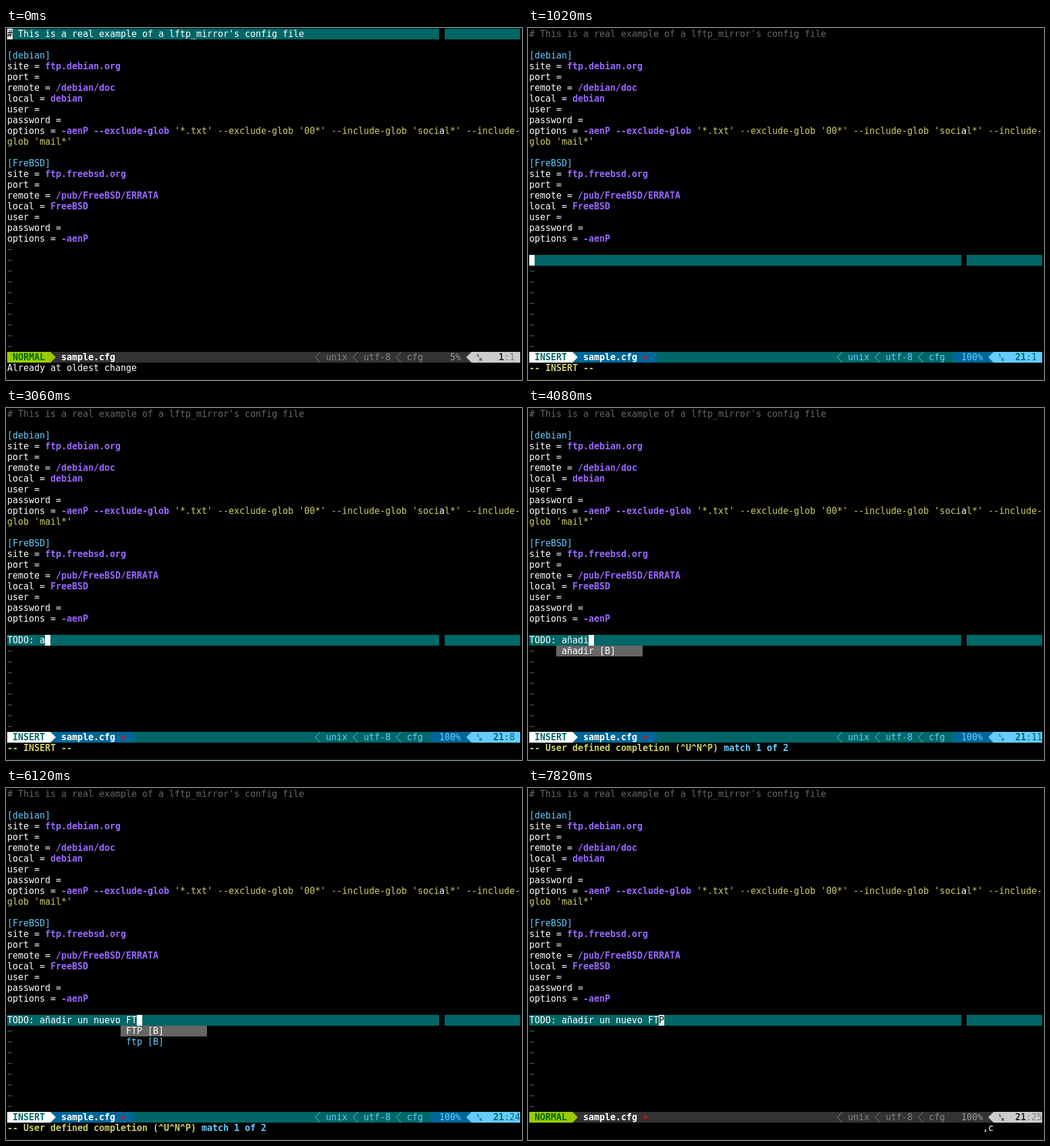
These frames come from a looping animation (860 by 588 pixels, 8 s). An HTML page with a canvas:

```html
<!DOCTYPE html>
<html lang="en">
<head>
<meta charset="utf-8">
<title>Editor session</title>
<style>
  html, body { margin: 0; width: 860px; height: 588px; overflow: hidden; background: #000; }
  canvas { display: block; }
</style>
</head>
<body>
<canvas id="screen" width="860" height="588"></canvas>
<script>
const ctx = document.getElementById('screen').getContext('2d');
const LOOP = 8000, CELL = 9, LINE = 18, COLS = 95, MARGIN_COL = 80;
const STATUS_ROW = 30, MESSAGE_ROW = 31;
const FAMILY = '"DejaVu Sans Mono", monospace';

const WHITE = '#ffffff', BLACK = '#000000', TEAL = '#006666', BLUE = '#006699',
      SKY = '#66ccff', PURPLE = '#9966ff', YELLOW = '#cccc66', GRAY = '#666666';

const X = col => 2 + col * CELL;
const Y = row => 1 + row * LINE;

function box(col, row, cols, color) {
  ctx.fillStyle = color;
  ctx.fillRect(X(col), Y(row), cols * CELL, LINE);
}

function put(col, row, text, color, bold = false) {
  ctx.font = (bold ? 'bold ' : '') + '15px ' + FAMILY;
  ctx.fillStyle = color;
  [...text].forEach((ch, i) => {
    if (ch !== ' ') ctx.fillText(ch, X(col + i), Y(row) + 14);
  });
}

// Filled status-line divider; dir is 1 for right-pointing, -1 for left-pointing.
function arrow(col, dir, color) {
  const base = X(dir > 0 ? col : col + 1), y = Y(STATUS_ROW);
  ctx.fillStyle = color;
  ctx.beginPath();
  ctx.moveTo(base, y);
  ctx.lineTo(base + dir * CELL, y + LINE / 2);
  ctx.lineTo(base, y + LINE);
  ctx.fill();
}

function chevron(col, color) {
  const x = X(col), y = Y(STATUS_ROW);
  ctx.strokeStyle = color;
  ctx.lineWidth = 1;
  ctx.beginPath();
  ctx.moveTo(x + 8.5, y + 0.5);
  ctx.lineTo(x + 0.5, y + LINE / 2);
  ctx.lineTo(x + 8.5, y + LINE - 0.5);
  ctx.stroke();
}

// Each row is a list of [text, color, bold] runs.
const setting = (key, value = '') => [[key + ' = ', WHITE], [value, PURPLE, true]];
const section = name => [['[' + name + ']', SKY]];
const FILE = [
  [["# This is a real example of a lftp_mirror's config file", GRAY]],
  [],
  section('debian'),
  setting('site', 'ftp.debian.org'),
  setting('port'),
  setting('remote', '/debian/doc'),
  setting('local', 'debian'),
  setting('user'),
  setting('password'),
  [...setting('options', '-aenP --exclude-glob'),
   [" '*.txt' --exclude-glob '00*' --include-glob 'social*' --include-", YELLOW]],
  [["glob 'mail*'", YELLOW]],
  [],
  section('FreBSD'),
  setting('site', 'ftp.freebsd.org'),
  setting('port'),
  setting('remote', '/pub/FreeBSD/ERRATA'),
  setting('local', 'FreeBSD'),
  setting('user'),
  setting('password'),
  setting('options', '-aenP')
];

const NORMAL = {
  name: 'NORMAL', modeBg: '#99cc00', modeFg: '#006600', fileBg: '#333333', midBg: '#333333',
  info: '#808080', dividers: ['#aa8866', '#7788aa', '#6688aa'], percentBg: '#333333',
  percentFg: '#999999', posBg: '#cccccc', lineFg: '#262626', colFg: '#808080'
};
const INSERT = {
  name: 'INSERT', modeBg: WHITE, modeFg: TEAL, fileBg: BLUE, midBg: TEAL,
  info: SKY, dividers: [SKY, SKY, SKY], percentBg: BLUE,
  percentFg: SKY, posBg: SKY, lineFg: TEAL, colFg: TEAL
};

const OLDEST = [['Already at oldest change', WHITE]];
const INSERTING = [['-- INSERT --', YELLOW, true]];
const COMPLETING = [['-- User defined completion (^U^N^P) ', YELLOW, true],
                    ['match 1 of 2', SKY, true]];

const browse = (at, row, line, percent) =>
  ({ at, mode: NORMAL, row, col: 0, line, column: 1, percent, message: OLDEST });

// The status line lags one column behind while the completion menu is open.
const type = (at, text, menu) => ({
  at, mode: INSERT, text, row: 21, col: text.length, line: 21, percent: '100%',
  column: text.length + (menu ? 0 : 1), menu, message: menu ? COMPLETING : INSERTING
});

const leave = (at, mode, column, keys) => ({
  at, mode, text: 'TODO: añadir un nuevo FTP', row: 21, col: 24, line: 21,
  percent: '100%', column, keys, message: []
});

const STEPS = [
  browse(0, 0, 1, '5%'),
  browse(340, 19, 19, '100%'),
  type(1020, ''),
  type(1700, 'TO', { col: 0, items: ['TODO [B]'] }),
  type(2040, 'TODO'),
  type(2380, 'TODO: '),
  type(3060, 'TODO: a'),
  type(3740, 'TODO: añ'),
  type(4080, 'TODO: añadi', { col: 6, items: ['añadir [B]'] }),
  type(4420, 'TODO: añadir '),
  type(4760, 'TODO: añadir u'),
  type(5100, 'TODO: añadir un '),
  type(5440, 'TODO: añadir un nue', { col: 16, items: ['nuevo [B]'] }),
  type(5780, 'TODO: añadir un nuevo '),
  type(6120, 'TODO: añadir un nuevo FT', { col: 22, items: ['FTP [B]', 'ftp [B]'] }),
  type(6800, 'TODO: añadir un nuevo FTP'),
  leave(7140, INSERT, 26, '^['),
  leave(7820, NORMAL, 25, ',c')
];

function drawRow(row, runs, step) {
  const current = row === step.row;
  if (current) {
    box(0, row, COLS, TEAL);
    box(MARGIN_COL, row, 1, BLACK);
    box(step.col, row, 1, WHITE);
  }
  let col = 0;
  for (const [text, color, bold] of runs) {
    for (const ch of text) {
      const underCursor = current && col === step.col;
      const plain = current || col === MARGIN_COL;
      put(col, row, ch, underCursor ? BLACK : plain ? WHITE : color, bold);
      col++;
    }
  }
}

function drawMenu({ col, items }, row) {
  const pad = col > 0 ? 1 : 0;
  items.forEach((item, i) => {
    box(col - pad, row + 1 + i, 15 + pad, i ? BLACK : GRAY);
    put(col, row + 1 + i, item, i ? SKY : WHITE);
  });
}

function drawStatus({ mode, text, percent, line, column }) {
  const row = STATUS_ROW;
  const modified = text !== undefined;
  box(0, row, COLS, mode.midBg);
  if (modified) {
    box(8, row, 15, mode.fileBg);
    arrow(23, 1, mode.fileBg);
    put(21, row, '+', '#ff0000', true);
  }
  box(0, row, 8, mode.modeBg);
  arrow(8, 1, mode.modeBg);
  put(1, row, mode.name, mode.modeFg, true);
  put(10, row, 'sample.cfg', WHITE, true);

  [[57, 'unix'], [64, 'utf-8'], [72, 'cfg']].forEach(([col, label], i) => {
    chevron(col, mode.dividers[i]);
    put(col + 2, row, label, mode.info);
  });

  arrow(78, -1, mode.percentBg);
  box(79, row, 7, mode.percentBg);
  put(80, row, percent.padStart(4), mode.percentFg);
  arrow(85, -1, mode.posBg);
  box(86, row, 9, mode.posBg);

  ctx.font = 'bold 7px ' + FAMILY;
  ctx.fillStyle = mode.lineFg;
  ctx.fillText('L', X(87), Y(row) + 8);
  ctx.fillText('N', X(87) + 4, Y(row) + 15);
  put(90, row, String(line).padStart(2), mode.lineFg, true);
  put(92, row, ':' + column, mode.colFg);
}

function draw(step) {
  ctx.fillStyle = BLACK;
  ctx.fillRect(0, 0, 860, 588);
  ctx.fillStyle = '#0a2030';
  ctx.fillRect(0, 587, 860, 1);

  const rows = step.text === undefined ? FILE : [...FILE, [], [[step.text, WHITE]]];
  rows.forEach((runs, row) => drawRow(row, runs, step));
  for (let row = rows.length; row < STATUS_ROW; row++) put(0, row, '~', '#336666');

  if (step.menu) drawMenu(step.menu, step.row);
  drawStatus(step);

  let col = 0;
  for (const [text, color, bold] of step.message) {
    put(col, MESSAGE_ROW, text, color, bold);
    col += text.length;
  }
  if (step.keys) put(84, MESSAGE_ROW, step.keys, WHITE);
}

const start = performance.now();
function tick() {
  const t = (performance.now() - start) % LOOP;
  draw(STEPS.findLast(step => step.at <= t));
  requestAnimationFrame(tick);
}
tick();
</script>
</body>
</html>
```
